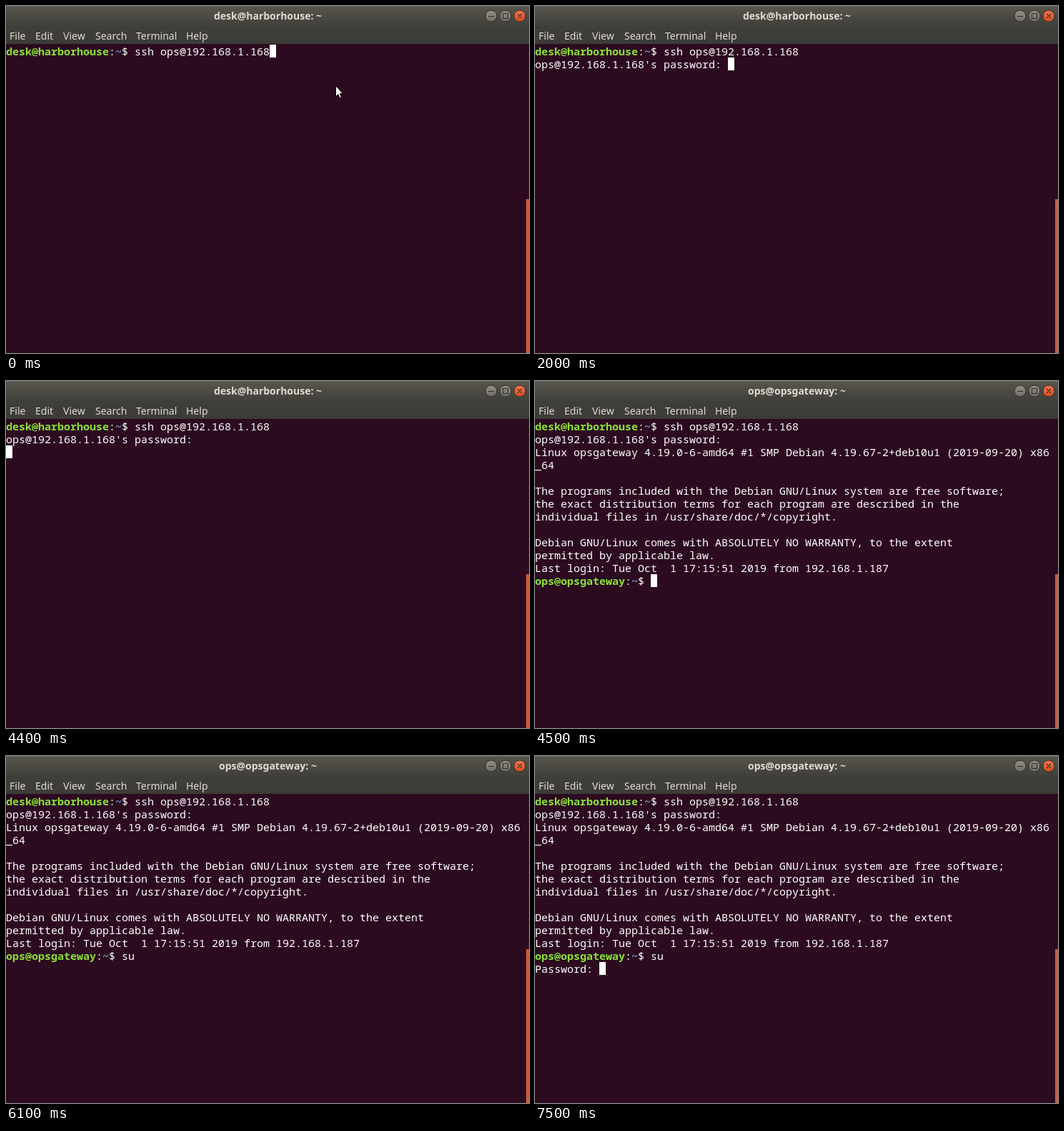
Recreate the animation shown at these times as an HTML page. Size 732 by 485 pixels, loop 8 s.

```html
<!DOCTYPE html>
<html lang="en">
<head>
<meta charset="utf-8">
<title>Terminal session</title>
<style>
  html, body { margin: 0; width: 732px; height: 485px; overflow: hidden; background: #2c0a20; }
  #stage { position: relative; width: 732px; height: 485px; overflow: hidden; }
  svg { position: absolute; left: 0; top: 0; }
  svg text { font: 14px "Noto Sans", "Open Sans", sans-serif; fill: #dfdbd2; }
  svg #title { font-weight: 700; text-anchor: middle; }
  #screen {
    position: absolute; left: 0; top: 54px; margin: 0; color: #fff;
    font: 15px/18px "Noto Sans Mono", "DejaVu Sans Mono", monospace;
  }
  #screen b { color: #8ae234; }
  #screen i { color: #729fcf; font-style: normal; font-weight: 700; }
  #block { position: absolute; width: 9px; height: 18px; background: #fff; }
</style>
</head>
<body>
<div id="stage">
  <pre id="screen"></pre>
  <div id="block"></div>
  <svg width="732" height="485" viewBox="0 0 732 485">
    <defs>
      <linearGradient id="bar" x2="0" y2="1">
        <stop offset="0" stop-color="#58564e"/>
        <stop offset=".55" stop-color="#3f3e39"/>
        <stop offset="1" stop-color="#3c3b37"/>
      </linearGradient>
      <linearGradient id="grey" x2="0" y2="1">
        <stop offset="0" stop-color="#929086"/>
        <stop offset="1" stop-color="#6f6d65"/>
      </linearGradient>
      <linearGradient id="orange" x2="0" y2="1">
        <stop offset="0" stop-color="#f4764e"/>
        <stop offset="1" stop-color="#df4c1f"/>
      </linearGradient>
    </defs>
    <rect width="732" height="53" fill="url(#bar)"/>
    <rect width="732" height="1" fill="#67645b"/>
    <text id="title" x="366.5" y="19"></text>
    <g id="menu"></g>
    <g stroke="#2f2e2a">
      <circle cx="679" cy="14" r="8" fill="url(#grey)"/>
      <circle cx="699" cy="14" r="8" fill="url(#grey)"/>
      <circle cx="719" cy="14" r="8" fill="url(#orange)"/>
      <path d="M675 14.5h8M695.5 10.5h7v7h-7zM716 11l6 6m0-6l-6 6" fill="none" stroke-width="1.1"/>
    </g>
    <rect x="728" y="270" width="4" height="215" fill="#c95c3d"/>
    <path id="arrow" d="M461.5 111.5v15.2l3.4-3.2 2.2 5 2.5-1.1-2.2-4.9h4.2z" fill="#fff" stroke="#000"/>
    <g id="beam" fill="none">
      <path d="M461 107.5h5M463.5 107v13M461 119.5h5" stroke="#000" stroke-width="3"/>
      <path d="M461 107.5h5M463.5 107v13M461 119.5h5" stroke="#fff"/>
    </g>
  </svg>
</div>
<script>
const $ = id => document.getElementById(id);
const LOOP = 8000, CELL = 9, ROW = 18, TOP = 54;

const prompt = who => `<b>${who}</b>:<i>~</i>$ `;
const local = 'desk@harborhouse', remote = 'ops@opsgateway';

const command = prompt(local) + 'ssh ops@192.168.1.168';
const entered = command + '\n';
const asked = entered + "ops@192.168.1.168's password: ";
const sent = asked + '\n';
const login = sent + `Linux opsgateway 4.19.0-6-amd64 #1 SMP Debian 4.19.67-2+deb10u1 (2019-09-20) x86
_64

The programs included with the Debian GNU/Linux system are free software;
the exact distribution terms for each program are described in the
individual files in /usr/share/doc/*/copyright.

Debian GNU/Linux comes with ABSOLUTELY NO WARRANTY, to the extent
permitted by applicable law.
Last login: Tue Oct  1 17:15:51 2019 from 192.168.1.187
` + prompt(remote);
const su = login + 'su';
const suAsked = su + '\nPassword: ';

// start time, screen text, block shown
const steps = [
  [0, command, 1], [100, command, 0], [900, command, 1], [1500, command, 0],
  [1900, entered, 1],
  [2000, asked, 1], [2500, asked, 0], [3100, asked, 1], [3700, asked, 0], [3900, asked, 1],
  [4400, sent, 1],
  [4500, login, 1], [4900, login, 0], [5300, login, 1],
  [5400, login + 's', 1],
  [5600, su, 1], [6100, su, 0], [6200, su, 1],
  [6400, suAsked, 1], [7000, suAsked, 0], [7500, suAsked, 1]
];

const menu = { File: 5, Edit: 41, View: 80, Search: 125, Terminal: 182, Help: 252 };
$('menu').innerHTML = Object.entries(menu)
  .map(([label, x]) => `<text x="${x}" y="47">${label}</text>`).join('');

const show = (id, on) => { $(id).style.visibility = on ? 'visible' : 'hidden'; };

let current;
function render(t) {
  const step = steps.findLast(s => s[0] <= t);
  if (step === current) return;
  current = step;
  const [start, text, on] = step;
  $('screen').innerHTML = text;
  const lines = text.replace(/<[^>]+>/g, '').split('\n');
  $('block').style.left = lines.at(-1).length * CELL + 'px';
  $('block').style.top = TOP + (lines.length - 1) * ROW + 'px';
  show('block', on);
  show('arrow', start < 100);
  show('beam', start >= 100 && start < 1900);
  $('title').textContent = (start < 4500 ? local : remote) + ': ~';
}

const origin = performance.now();
function tick() {
  render((performance.now() - origin) % LOOP);
  requestAnimationFrame(tick);
}
tick();
</script>
</body>
</html>
```
